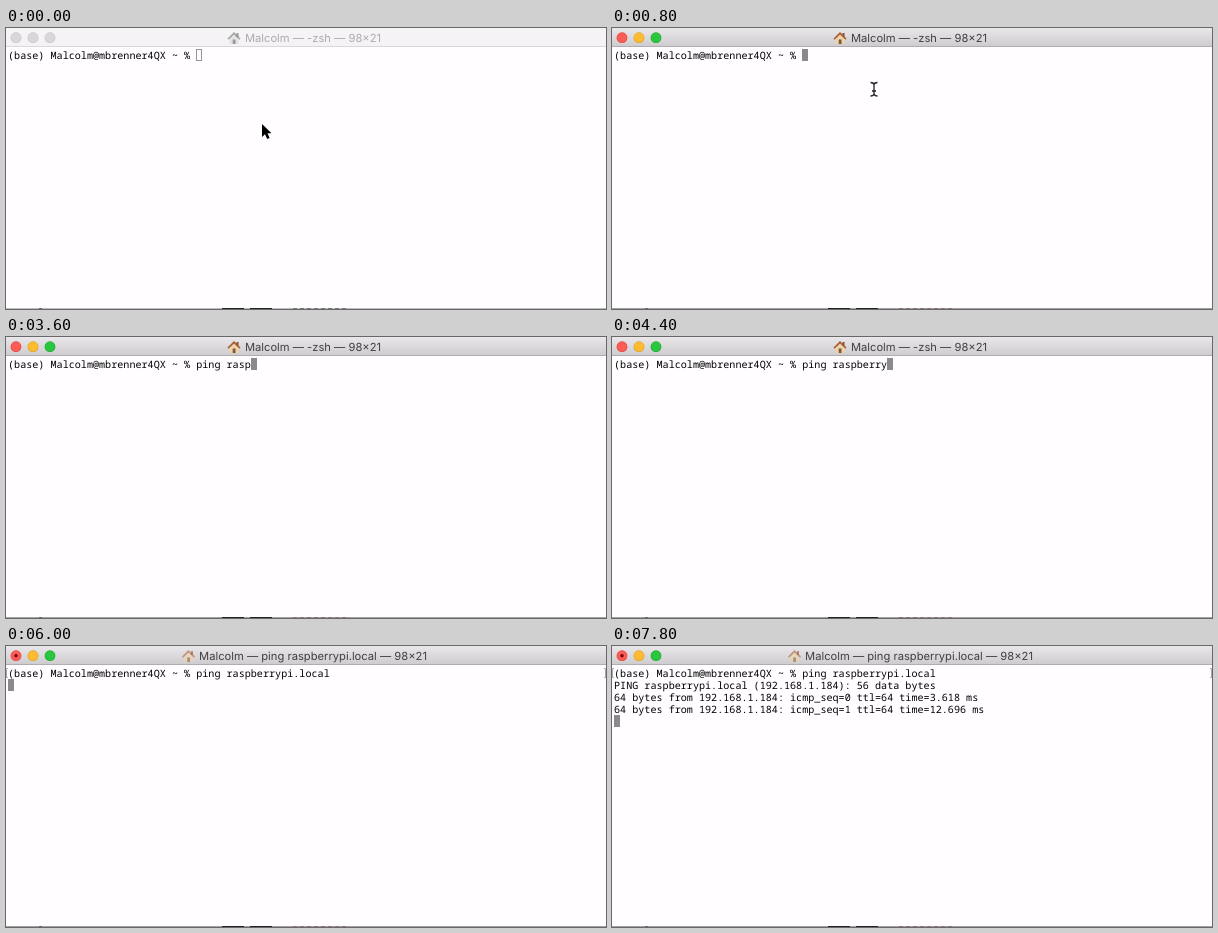
An HTML page with a canvas for the animation above (8000 ms loop, 600 by 281 pixels).

```html
<!DOCTYPE html>
<html lang="en">
<head>
<meta charset="utf-8">
<title>Terminal ping</title>
<style>
  html, body { margin: 0; width: 100%; height: 100%; overflow: hidden; background: #fffdff; }
  canvas { display: block; }
</style>
</head>
<body>
<canvas id="stage" width="600" height="281"></canvas>
<script>
const ctx = document.getElementById('stage').getContext('2d');
const LOOP = 8000, CELL = 6.07, ROW = 12;
const USER = 'Malcolm';
const PROMPT = `(base) ${USER}@mbrenner4QX ~ % `;
const COMMAND = 'ping raspberrypi.local';
const ACTIVE = 200, RUN = 6000;

// [time, characters typed]
const KEYS = [[2600, 2], [2800, 3], [3000, 4], [3200, 5], [3400, 7], [3600, 9],
  [3800, 10], [4000, 11], [4200, 13], [4400, 14], [4600, 16],
  [5000, 17], [5200, 18], [5400, 20], [5600, 21], [5800, 22]];

const OUTPUT = [
  [6400, 'PING raspberrypi.local (192.168.1.184): 56 data bytes'],
  [6400, '64 bytes from 192.168.1.184: icmp_seq=0 ttl=64 time=3.618 ms'],
  [7400, '64 bytes from 192.168.1.184: icmp_seq=1 ttl=64 time=12.696 ms']];

// [time, x, y] of the I-beam
const POINTER = [[200, 257, 104], [400, 268, 141], [600, 265, 98], [800, 262, 61]];

const latest = (steps, t) => steps.filter(s => s[0] <= t).pop();

function rect(color, x, y, w, h) {
  ctx.fillStyle = color;
  ctx.fillRect(x, y, w, h);
}

function disc(color, x, y, r) {
  ctx.fillStyle = color;
  ctx.beginPath();
  ctx.arc(x, y, r, 0, 7);
  ctx.fill();
}

function polygon(color, points) {
  ctx.fillStyle = color;
  ctx.beginPath();
  points.forEach(([x, y]) => ctx.lineTo(x, y));
  ctx.closePath();
  ctx.fill();
}

function house(x, alpha) {
  ctx.save();
  ctx.globalAlpha = alpha;
  ctx.translate(x, 4);
  rect('#8b4a35', 9, 1, 2, 4);
  polygon('#ecd3a8', [[2, 6], [6.5, 2], [11, 6], [11, 12], [2, 12]]);
  polygon('#a65a35', [[0, 6.6], [6.5, 0], [13, 6.6], [12, 7.8], [6.5, 2.6], [1, 7.8]]);
  rect('#80573d', 5.2, 7.5, 2.8, 4.5);
  ctx.restore();
}

function titleBar(active, running) {
  const shade = ctx.createLinearGradient(0, 0, 0, 19);
  shade.addColorStop(0, active ? '#e9e7e9' : '#f6f4f6');
  shade.addColorStop(1, active ? '#cdcbcd' : '#f4f2f4');
  rect(shade, 0, 0, 600, 19);
  rect(active ? '#afadaf' : '#d9d7d9', 0, 18, 600, 1);

  const fills = active ? ['#fb5c56', '#fcbb30', '#2bc640'] : Array(3).fill('#d9d7d9');
  const rims = active ? ['#e0443f', '#dda023', '#1dab2d'] : Array(3).fill('#c6c4c6');
  fills.forEach((fill, i) => {
    disc(rims[i], 10 + 17 * i, 9.7, 5.4);
    disc(fill, 10 + 17 * i, 9.7, 4.8);
  });
  if (running) disc('#7b0905', 10, 9.7, 1.8);

  ctx.filter = active ? 'none' : 'grayscale(1)';
  house(running ? 176 : 221.5, active && !running ? 1 : 0.55);
  ctx.filter = 'none';
  ctx.font = '11.2px Inter, sans-serif';
  ctx.textAlign = 'center';
  ctx.fillStyle = active ? '#424042' : '#adabad';
  ctx.fillText(`${USER} — ${running ? COMMAND : '-zsh'} — 98×21`, 307, 14);
}

function textRow(text, row) {
  ctx.font = '500 10.1px "Noto Sans Mono", monospace';
  ctx.textAlign = 'left';
  ctx.fillStyle = '#000';
  [...text].forEach((c, i) => ctx.fillText(c, 2 + i * CELL, 30.6 + row * ROW));
}

function caret(column, row, active) {
  const x = Math.round(2 + column * CELL), y = 21 + row * ROW;
  if (active) return rect('#8b898b', x, y, 6, 12);
  ctx.strokeStyle = '#979597';
  ctx.lineWidth = 1;
  ctx.strokeRect(x + 0.5, y + 0.5, 5, 11);
}

function rowMarks() {
  ctx.strokeStyle = '#aaa8aa';
  ctx.lineWidth = 1;
  ctx.stroke(new Path2D('M2 22.5H.5V31.5H2M598 22.5H599.5V31.5H598'));
}

function arrow(x, y) {
  const outline = new Path2D('M0 0V13L3 10.2L5.2 15L7.6 14L5.5 9.2H9.5Z');
  ctx.save();
  ctx.translate(x, y);
  ctx.strokeStyle = '#fff';
  ctx.lineWidth = 2;
  ctx.stroke(outline);
  ctx.fillStyle = '#000';
  ctx.fill(outline);
  ctx.restore();
}

function iBeam(x, y) {
  ctx.save();
  ctx.translate(x, y);
  ctx.strokeStyle = '#222';
  ctx.lineWidth = 1.3;
  ctx.stroke(new Path2D('M-3.5-6.5Q-.5-6.5 0-4.5Q.5-6.5 3.5-6.5M0-5V6M-3.5 7Q-.5 7 0 5Q.5 7 3.5 7M-2 2H2'));
  ctx.restore();
}

function bottomEdge(active) {
  rect(active ? '#a3a1a3' : '#bebcbe', 0, 280, 600, 1);
  rect('#222', 216, 280, 22, 1);
  rect('#222', 244, 280, 22, 1);
  rect('#666', 33, 280, 3, 1);
  for (let x = 287; x < 340; x += 7) rect(active ? '#8f7076' : '#777', x, 280, 4, 1);
}

function draw(t) {
  const active = t >= ACTIVE, running = t >= RUN;
  const typed = (latest(KEYS, t) || [0, 0])[1];
  const input = PROMPT + COMMAND.slice(0, typed);
  const output = OUTPUT.filter(([start]) => start <= t);

  rect('#fffdff', 0, 0, 600, 281);
  titleBar(active, running);
  bottomEdge(active);
  if (running) rowMarks();
  textRow(input, 0);
  output.forEach(([, text], i) => textRow(text, i + 1));
  caret(running ? 0 : input.length, running ? output.length + 1 : 0, active);

  if (!active) arrow(256, 96);
  else if (!typed) iBeam(...latest(POINTER, t).slice(1));
}

ctx.textRendering = 'geometricPrecision';
function tick() {
  draw(performance.now() % LOOP);
  requestAnimationFrame(tick);
}
tick();
</script>
</body>
</html>
```
